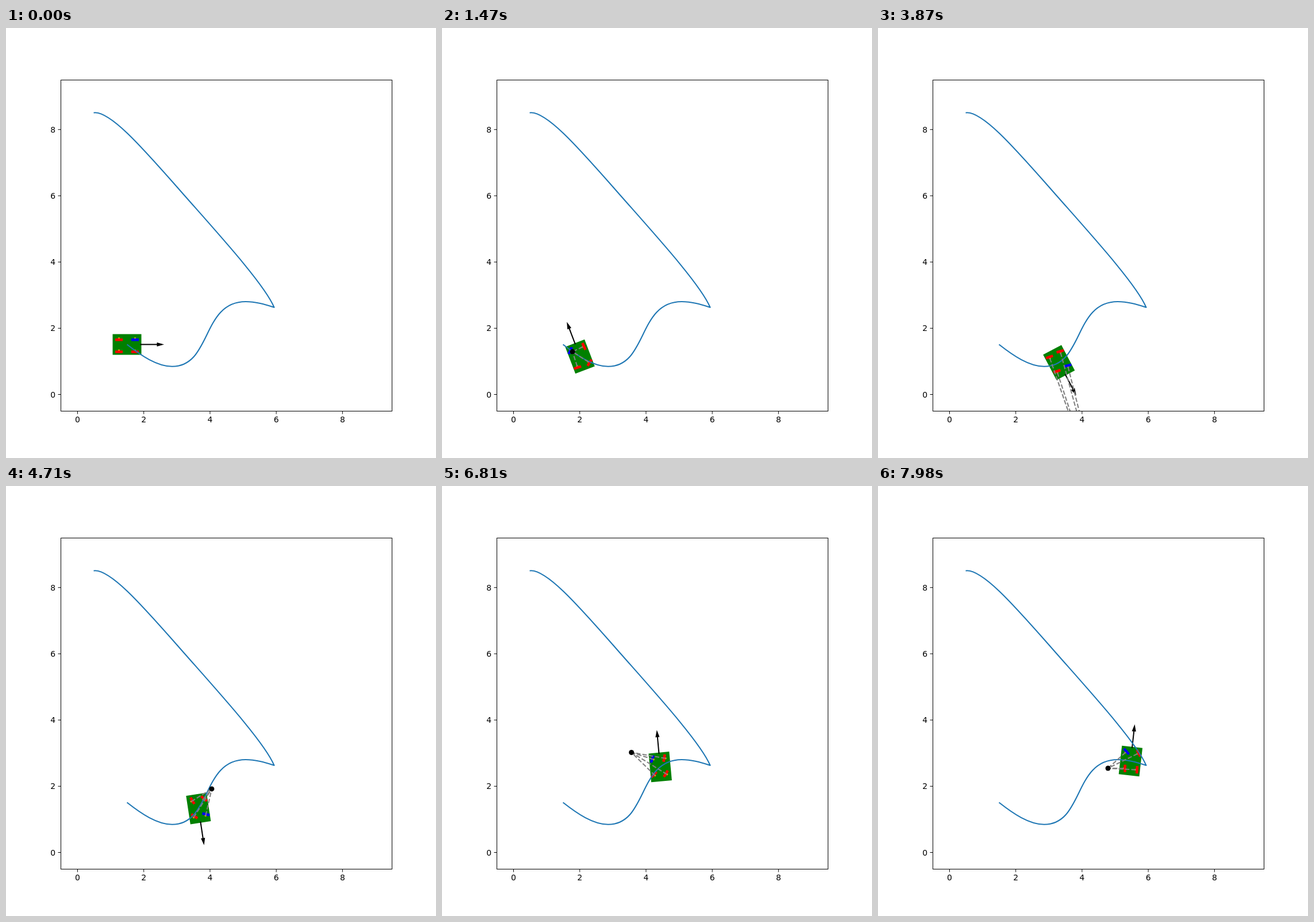
Animation, 748 px wide and 748 px high, one loop 8000 ms. Source, as an HTML page with a canvas:

```html
<!DOCTYPE html>
<html lang="en">
<head>
<meta charset="utf-8">
<title>Swerve robot on a path</title>
<style>
  html, body { margin: 0; width: 100%; height: 100%; overflow: hidden; background: #fff; }
  canvas { display: block; }
</style>
</head>
<body>
<canvas id="stage" width="748" height="748"></canvas>
<script>
const ctx = document.getElementById('stage').getContext('2d');
const LOOP = 8000, STEP = 30, RAD = Math.PI / 180;
const BOX = { x: 95.5, y: 90.5, size: 576 };
const UNIT = 57.6, ORIGIN = { x: 124.5, y: 637.5 };
const BODY = { length: 50, width: 36 }, WHEEL = { length: 13, width: 4.6 };

const ROUTE = `M210.5 550.5 C236 570.5 263 588.8 289 588.8 C358 588.8 340 476 417 476
  C435 476 452 481.5 466.5 486 C449 444 360 348 297 276 C237 208 180 143 152.5 147.5`;
const routeLine = new Path2D(ROUTE);
const route = document.createElementNS('http://www.w3.org/2000/svg', 'path');
route.setAttribute('d', ROUTE);

// The robot turns in eased swings, first left, then right, then left again.
const SWINGS = [
  { start: 0, end: 3940, from: 0, to: 298, power: 0.886 },
  { start: 3940, end: 7550, from: 298, to: 69, power: 1.083 },
  { start: 7550, end: 9550, from: 69, to: 202, power: 1 }
];

function heading(time) {
  const { start, end, from, to, power } = SWINGS.find(swing => time < swing.end);
  const progress = Math.max(0, (time - start) / (end - start)) ** power;
  return RAD * (from + (to - from) * (1 - Math.cos(Math.PI * progress)) / 2);
}

// Smooth cubic curve through [time, value] pairs.
function spline(...keys) {
  const slope = (a, b) => (b[1] - a[1]) / (b[0] - a[0]);
  const tangents = keys.map((key, i) => {
    const prev = keys[i - 1], next = keys[i + 1];
    if (!prev) return slope(key, next);
    if (!next) return slope(prev, key);
    const before = key[0] - prev[0], after = next[0] - key[0];
    return (slope(prev, key) * after + slope(key, next) * before) / (before + after);
  });
  return time => {
    let i = 0;
    while (i < keys.length - 2 && time > keys[i + 1][0]) i++;
    const [a, from] = keys[i], [b, to] = keys[i + 1];
    const d = b - a, u = (time - a) / d, v = 1 - u;
    return v * v * (1 + 2 * u) * from + u * u * (3 - 2 * u) * to
      + d * u * v * (v * tangents[i] - u * tangents[i + 1]);
  };
}

const distance = spline([0, 0], [1470, 36.3], [2580, 76.4], [3870, 115.9], [5670, 182], [6810, 230.8], [7980, 293.7]);
// Speed (px/ms) and direction relative to the heading (degrees) that fix the turning centre.
const speed = spline([0, 0.003], [1470, 0.031], [3940, 0.028], [5670, 0.053], [6810, 0.066], [7980, 0.047]);
const drift = spline([0, -20], [1470, -54], [2580, -73], [4000, -105], [5670, -174], [6810, -212], [7980, -336]);

function line(a, b) {
  ctx.beginPath();
  ctx.moveTo(a.x, a.y);
  ctx.lineTo(b.x, b.y);
  ctx.stroke();
}

function disc({ x, y }, radius, color) {
  ctx.fillStyle = color;
  ctx.beginPath();
  ctx.arc(x, y, radius, 0, 2 * Math.PI);
  ctx.fill();
}

function placed({ x, y }, angle, draw) {
  ctx.save();
  ctx.translate(x, y);
  ctx.rotate(angle);
  draw();
  ctx.restore();
}

function drawBody() {
  ctx.fillStyle = 'green';
  ctx.fillRect(-BODY.length / 2, -BODY.width / 2, BODY.length, BODY.width);
  ctx.fillStyle = '#000';
  ctx.fillRect(23, -1, 30, 2);
  ctx.beginPath();
  ctx.moveTo(64.5, 0);
  ctx.lineTo(52, -3.6);
  ctx.lineTo(52, 3.6);
  ctx.fill();
}

function wheelsAround(centre, angle) {
  const cos = Math.cos(angle), sin = Math.sin(angle), wheels = [];
  for (const ahead of [14, -14]) {
    for (const side of [-10.5, 10.5]) {
      wheels.push({
        x: centre.x + ahead * cos - side * sin,
        y: centre.y + ahead * sin + side * cos,
        color: wheels.length ? 'red' : 'blue'
      });
    }
  }
  return wheels;
}

function drawRobot(time) {
  const centre = route.getPointAtLength(distance(time));
  const angle = heading(time), moving = time > 0;
  const turnRate = heading(time + 0.5) - heading(time - 0.5);
  const radius = speed(time) / turnRate;
  const direction = angle + drift(time) * RAD;
  const pole = { x: centre.x - radius * Math.sin(direction), y: centre.y - radius * Math.cos(direction) };
  const wheels = wheelsAround(centre, -angle);
  const turn = Math.sign(turnRate);

  placed(centre, -angle, drawBody);
  for (const wheel of wheels) {
    const roll = moving ? Math.atan2(turn * (pole.x - wheel.x), turn * (wheel.y - pole.y)) : 0;
    disc(wheel, 1.8, 'orange');
    placed(wheel, roll, () => {
      ctx.fillStyle = wheel.color;
      ctx.fillRect(-WHEEL.length / 2, 0, WHEEL.length, WHEEL.width);
    });
  }

  ctx.lineWidth = 2.08;
  ctx.lineJoin = 'round';
  ctx.strokeStyle = '#1f77b4';
  ctx.stroke(routeLine);
  if (!moving) return;
  ctx.strokeStyle = 'gray';
  ctx.setLineDash([7.7, 3.33]);
  wheels.forEach(wheel => line(wheel, pole));
  ctx.setLineDash([]);
  disc(pole, 4.5, '#000');
}

function drawAxes() {
  const bottom = BOX.y + BOX.size;
  ctx.strokeStyle = ctx.fillStyle = '#000';
  ctx.lineWidth = 1;
  ctx.strokeRect(BOX.x, BOX.y, BOX.size, BOX.size);
  ctx.font = '13.9px "DejaVu Sans", sans-serif';
  for (let value = 0; value <= 8; value += 2) {
    const x = ORIGIN.x + value * UNIT, y = ORIGIN.y - value * UNIT;
    line({ x, y: bottom }, { x, y: bottom + 5 });
    line({ x: BOX.x, y }, { x: BOX.x - 5, y });
    ctx.textAlign = 'center';
    ctx.fillText(value, x, bottom + 19.5);
    ctx.textAlign = 'right';
    ctx.fillText(value, BOX.x - 9.4, y + 5);
  }
}

function render(now) {
  ctx.fillStyle = '#fff';
  ctx.fillRect(0, 0, 748, 748);
  ctx.save();
  ctx.beginPath();
  ctx.rect(BOX.x, BOX.y, BOX.size, BOX.size);
  ctx.clip();
  drawRobot(Math.floor(now % LOOP / STEP) * STEP);
  ctx.restore();
  drawAxes();
}

const start = performance.now();
function tick() {
  render(performance.now() - start);
  requestAnimationFrame(tick);
}
tick();
</script>
</body>
</html>
```
